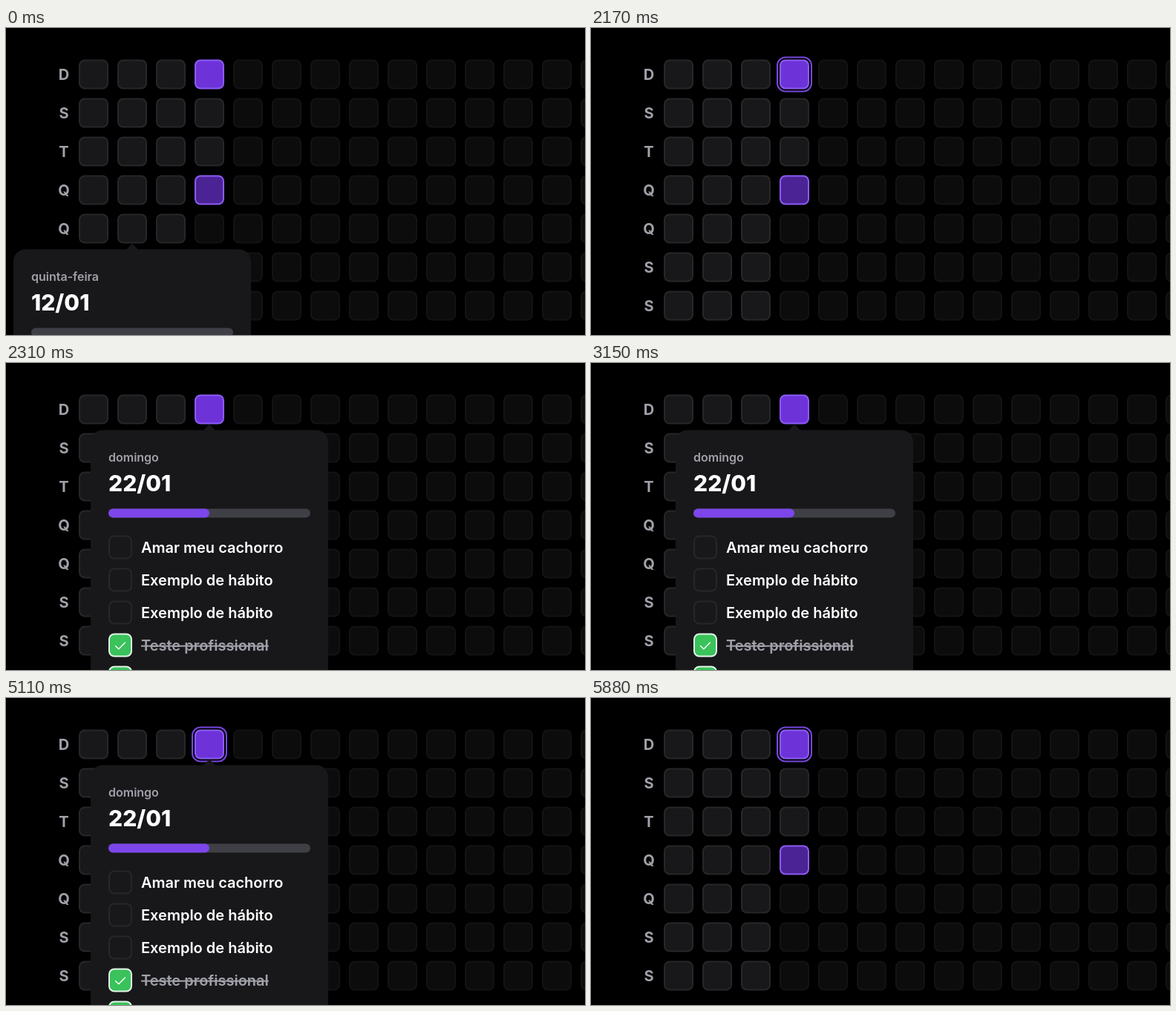
An HTML page that plays this animation: 780x414 px, repeating every 6.65 s.

```html
<!DOCTYPE html>
<html lang="pt-BR">
<head>
<meta charset="utf-8">
<title>Hábitos</title>
<style>
  html, body { margin: 0; width: 100%; height: 100%; overflow: hidden; background: #000; }
  svg { display: block; font-family: Inter, sans-serif; font-optical-sizing: none; }
  .day { font-size: 20px; font-weight: 700; fill: #a1a1aa; text-anchor: middle; }
  .weekday { font-size: 16px; font-weight: 600; fill: #a1a1aa; }
  .date { font-size: 30px; font-weight: 800; fill: #fff; }
  .habit { font-size: 20px; font-weight: 600; fill: #fff; }
  .done { fill: #a1a1aa; text-decoration: line-through; }
</style>
</head>
<body>
<svg id="stage" width="780" height="414" viewBox="0 0 780 414"></svg>
<script>
const stage = document.getElementById('stage');
const LOOP = 6650, TOP = 42.5, LEFT = 98, PITCH = 52;
const SURFACE = '#18181b', BORDER = '#27272a';

const text = (x, y, cls, content) => `<text x="${x}" y="${y}" class="${cls}">${content}</text>`;

// Rounded box whose 2px border lies inside its outer size.
const box = (x, y, size, fill, border, opacity = 1, radius = 7) =>
  `<rect x="${x + 1}" y="${y + 1}" width="${size - 2}" height="${size - 2}" rx="${radius}"
    fill="${fill}" stroke="${border}" stroke-width="2" opacity="${opacity}"/>`;

const bar = (width, fill) =>
  `<rect x="24" y="106" width="${width}" height="12" rx="6" fill="${fill}"/>`;

function cell(col, row) {
  const x = LEFT + col * PITCH, y = TOP + row * PITCH;
  if (col === 3 && row === 0) return box(x, y, 40, '#6d33d9', '#8b5cf6');
  if (col === 3 && row === 3) return box(x, y, 40, '#4c2394', '#8b5cf6');
  const past = col < 3 || (col === 3 && row < 4);
  return box(x, y, 40, SURFACE, BORDER, past ? 1 : 0.5);
}

function habit(label, index, done) {
  const y = 142 + index * 44;
  const check = done
    ? `<path d="M33.5 ${y + 17} l4.3 4.2 l8.7 -8.8" fill="none" stroke="#fff"
        stroke-width="1.4" stroke-linecap="round" stroke-linejoin="round"/>`
    : '';
  return box(24, y, 32, done ? '#3ac25b' : SURFACE, done ? '#e4f7e9' : BORDER) + check +
    text(68, y + 23.5, done ? 'habit done' : 'habit', label);
}

// Card centred below the given cell, with an arrow pointing up at it.
function popover(id, col, row, weekday, date, progress, habits) {
  const x = LEFT + col * PITCH + 20 - 160, y = TOP + row * PITCH + 48;
  return `<g id="${id}" transform="translate(${x} ${y})">
    <path d="M152 0.5 L160 -8 L168 0.5 Z" fill="${SURFACE}"/>
    <rect width="320" height="400" rx="16" fill="${SURFACE}"/>
    ${text(24, 42.5, 'weekday', weekday)}
    ${text(24, 82.5, 'date', date)}
    ${bar(272, '#3f3f46')}
    ${progress ? bar(272 * progress, '#7c46ea') : ''}
    ${habits.map(([label, done], i) => habit(label, i, done)).join('')}
  </g>`;
}

let markup = '';
[...'DSTQQSS'].forEach((day, row) => {
  markup += text(78, TOP + row * PITCH + 27.5, 'day', day);
  for (let col = 0; col < 14; col++) markup += cell(col, row);
});
markup += `<g id="ring">${box(250, TOP - 4, 48, 'none', '#7647de', 1, 11)}</g>`;
markup += popover('thursday', 1, 4, 'quinta-feira', '12/01', 0, []);
markup += popover('sunday', 3, 0, 'domingo', '22/01', 0.5, [
  ['Amar meu cachorro', false],
  ['Exemplo de hábito', false],
  ['Exemplo de hábito', false],
  ['Teste profissional', true],
  ['', true],
]);
stage.innerHTML = markup;

const [ring, thursday, sunday] = ['ring', 'thursday', 'sunday'].map(id => document.getElementById(id));
const show = (element, visible) => element.setAttribute('visibility', visible ? 'visible' : 'hidden');

function render(now) {
  const t = now % LOOP;
  show(thursday, t < 2170);
  show(sunday, t >= 2240 && t < 5390);
  show(ring, (t >= 2170 && t < 2240) || t >= 5110);
  requestAnimationFrame(render);
}
render(performance.now());
</script>
</body>
</html>
```
